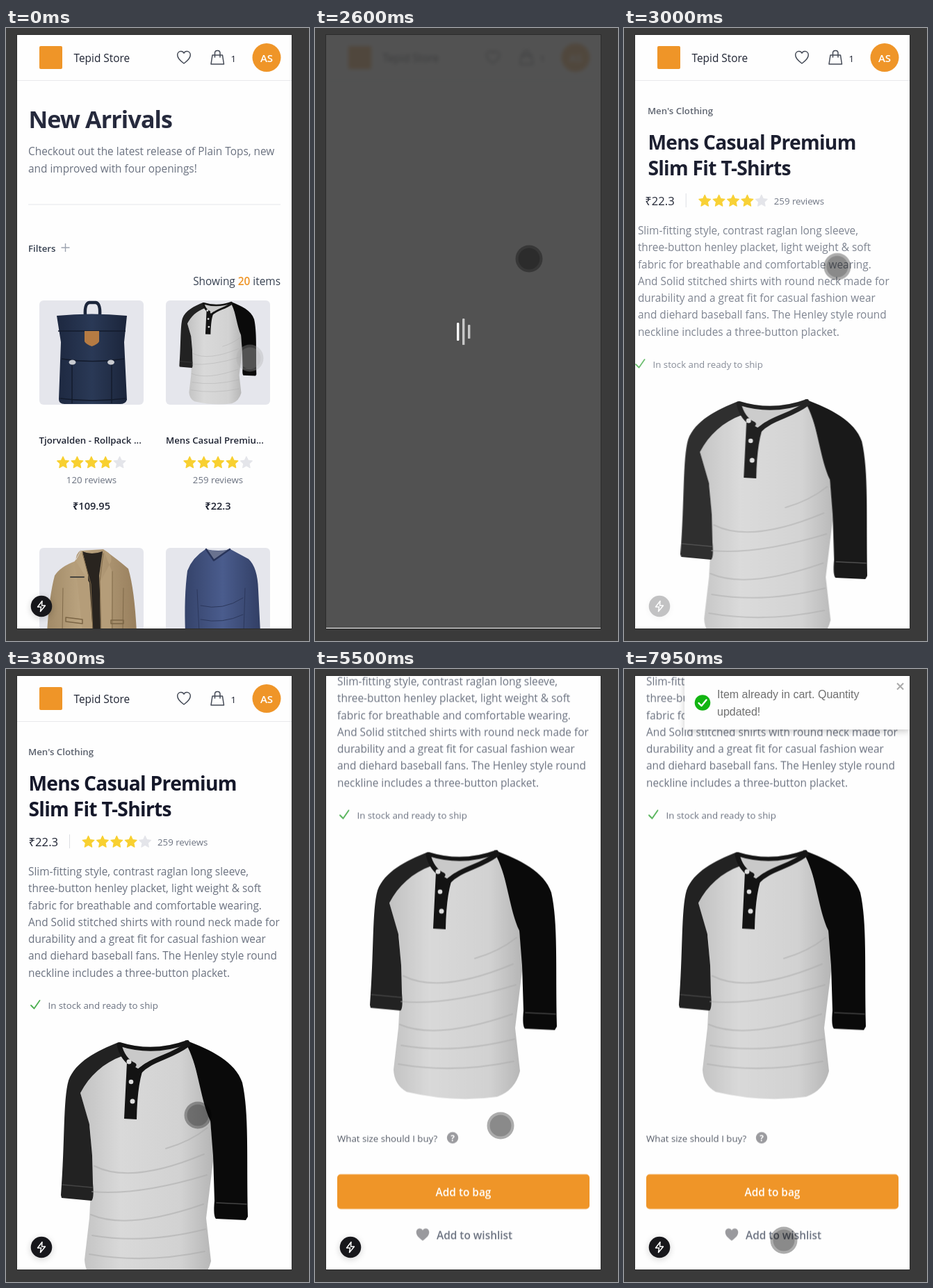
These frames come from a looping animation (436 px wide and 882 px high, 8 s). An HTML page:

```html
<!DOCTYPE html>
<html lang="en">
<head>
<meta charset="utf-8">
<title>Shop walkthrough</title>
<style>
html, body { margin: 0; width: 100%; height: 100%; overflow: hidden; background: #3a3a3a; }
svg { display: block; width: 436px; height: 882px; }
text { font: 400 15.4px "Open Sans", "Noto Sans", sans-serif; fill: #6b7280; white-space: pre; }
.small { font-size: 13.25px; }
.semi { font-weight: 600; }
.ink { fill: #1f2433; }
.mid { text-anchor: middle; }
.end { text-anchor: end; }
.title { font-weight: 700; letter-spacing: -.025em; fill: #15182a; }
.line { fill: none; stroke-linecap: round; stroke-linejoin: round; }
.toast text { font: 16px "Liberation Sans", Arial, sans-serif; fill: #707070; }

.scroll, .header, .list, .product, .slide, .badge, .shade, .loader, .toast, .cursor, .touch {
  animation: 8s linear infinite;
}
.scroll { animation-name: scroll; }
.header { animation-name: dim; }
.list { animation-name: leave; }
.product { animation-name: enter; }
.slide { animation-name: slide; animation-timing-function: ease-out; }
.badge { animation-name: badge; }
.shade { animation-name: shade; }
.loader { animation-name: loader; }
.toast { animation-name: toast; }
.cursor { animation-name: move; animation-timing-function: ease-in-out; }
.touch { animation-name: touch; }
.right { --from: 100px; --mid: 10px; --seen: .85; }
.photo { --from: 100px; --mid: 12px; --seen: .67; }
.left { --from: -100px; --mid: -12px; --seen: .85; }
.later { --from: -130px; --mid: -64px; --seen: .33; }
.last { --from: -130px; --mid: -100px; --seen: 0; }
.loader rect {
  transform-box: fill-box; transform-origin: center;
  animation: pulse .8s linear infinite;
}

@keyframes scroll {
  0%, 48.5% { transform: translateY(0); animation-timing-function: ease-in-out; }
  56.25%, 100% { transform: translateY(-273.5px); }
}
@keyframes dim {
  0%, 25.6% { opacity: 1; filter: blur(0); }
  29%, 32.8% { opacity: .3; filter: blur(2.5px); }
  34.4%, 100% { opacity: 1; filter: blur(0); }
}
@keyframes leave { 0%, 25.6% { opacity: 1; } 29%, 100% { opacity: 0; } }
@keyframes enter {
  0% { opacity: 0; animation-timing-function: step-end; }
  32.6%, 100% { opacity: 1; }
}
@keyframes slide {
  0%, 32.6% { transform: translateX(var(--from)); opacity: 0; }
  35% { transform: translateX(var(--mid)); opacity: var(--seen); }
  39%, 100% { transform: none; opacity: 1; }
}
@keyframes badge {
  0%, 25.6% { opacity: 1; }
  28%, 37% { opacity: 0; }
  39%, 100% { opacity: 1; }
}
@keyframes shade {
  0%, 25.6% { opacity: 0; }
  29%, 33% { opacity: .68; }
  35% { opacity: .325; }
  37%, 100% { opacity: 0; }
}
@keyframes loader {
  0%, 25.6% { opacity: 0; }
  28%, 35.6% { opacity: 1; }
  37%, 100% { opacity: 0; }
}
@keyframes pulse {
  0%, 100% { transform: scaleY(1); opacity: 1; }
  25%, 75% { transform: scaleY(.8); opacity: .68; }
}
@keyframes toast {
  0%, 80.5% { transform: translateX(345px); animation-timing-function: ease-out; }
  86%, 100% { transform: none; }
}
@keyframes move {
  0%, 23% { transform: translate(351px, 475px); }
  29%, 36.5% { transform: translate(308px, 332px); }
  44%, 49% { transform: translate(276px, 642px); }
  56%, 70% { transform: translate(267px, 657px); }
  77%, 90.5% { transform: translate(235px, 755px); }
  98%, 100% { transform: translate(230px, 822px); }
}
@keyframes touch {
  0%, 22% { fill: #aaa; }
  24%, 100% { fill: #000; }
}
</style>
</head>
<body>
<svg viewBox="0 0 436 882">
  <defs>
    <clipPath id="screen"><path d="M16 10H411V864H16z"/></clipPath>
    <clipPath id="tile"><rect width="150" height="150" rx="6"/></clipPath>
    <linearGradient id="cloth">
      <stop offset="0" stop-color="#c2c2c2"/><stop offset=".3" stop-color="#d9d9d9"/>
      <stop offset=".75" stop-color="#d2d2d2"/><stop offset="1" stop-color="#b5b5b5"/>
    </linearGradient>
    <linearGradient id="navy">
      <stop offset="0" stop-color="#1d2840"/><stop offset=".5" stop-color="#2a3956"/><stop offset="1" stop-color="#1b253b"/>
    </linearGradient>
    <linearGradient id="tan">
      <stop offset="0" stop-color="#a18a67"/><stop offset=".4" stop-color="#bca581"/><stop offset="1" stop-color="#987f5d"/>
    </linearGradient>
    <linearGradient id="blue">
      <stop offset="0" stop-color="#35436a"/><stop offset=".5" stop-color="#4a5c8d"/><stop offset="1" stop-color="#323f65"/>
    </linearGradient>
    <filter id="soft" x="-20%" y="-30%" width="140%" height="180%"><feGaussianBlur stdDeviation="5"/></filter>
    <path id="star" d="M0-8.3 2.5-2.9 8.4-2.2 4.1 1.9 5.2 7.6 0 4.8-5.2 7.6-4.1 1.9-8.4-2.2-2.5-2.9z" stroke-width="1.2" stroke-linejoin="round"/>
    <g id="stars">
      <g fill="#f8d030" stroke="#f8d030">
        <use href="#star"/><use href="#star" x="20.4"/><use href="#star" x="40.8"/><use href="#star" x="61.2"/>
      </g>
      <use href="#star" x="81.6" fill="#e4e5ea" stroke="#e4e5ea"/>
    </g>
    <path id="heart" d="M0 9C-5 5.5-9.3 1.8-9.3-3.2-9.3-6.3-7-8.5-4.3-8.5-2.3-8.5-.8-7.5 0-5.8.8-7.5 2.3-8.5 4.3-8.5 7-8.5 9.3-6.3 9.3-3.2 9.3 1.8 5 5.5 0 9z"/>

    <g id="shirt">
      <path fill="#c9c9c9" d="M164 537Q212 552 260 534L245 560 190 590 165 560z"/>
      <path fill="url(#cloth)" d="M163 549C140 560 116 585 107 610L121 660 124 712 120 790 113 850Q114 872 132 882 200 898 262 889 288 880 295 852L288 790 299 700 294 650 262 538C240 556 210 560 188 590L172 565z"/>
      <path fill="#222" d="M162 537C130 550 100 565 90 592 82 620 85 680 79 757L80 761 123 765Q127 762 125 740L124 700 120 655 107 610C120 585 140 567 167 557z"/>
      <path fill="#0a0a0a" d="M258 534C295 548 330 565 340 595 350 640 346 700 348 788L345 793 302 791Q298 787 300 765L298 700 294 650C280 620 277 575 262 545z"/>
      <path class="line" stroke="#151515" stroke-width="6" d="M164 540Q212 555 261 537"/>
      <path class="line" stroke="#151515" stroke-width="7" d="M163 541Q168 562 184 570M262 540C235 560 210 560 191 580"/>
      <path fill="#131313" d="M174 566 190 575 201 567Q189 590 188 648L170 647Z"/>
      <g fill="#ddd"><circle cx="177" cy="565" r="3.5"/><circle cx="180" cy="594" r="3.3"/><circle cx="182" cy="622" r="3.5"/></g>
      <g class="line" stroke="#a8a8a8" stroke-opacity=".5" stroke-width="2">
        <path d="M127 715Q180 742 285 698M124 752Q190 758 289 728M122 785Q175 808 284 770M124 815Q200 828 287 806M120 842Q200 856 286 838M230 690Q265 680 290 660"/>
      </g>
      <path class="line" stroke="#444" stroke-width="1.5" d="M81 742 124 746M303 768 346 770"/>
    </g>

    <g id="backpack">
      <path class="line" stroke="#1c263b" stroke-width="4.5" d="M66 21Q65 4 72 3H81Q88 4 87 21"/>
      <path fill="url(#navy)" d="M25 22Q75 17 126 22L122 60 126 143Q124 149 116 149H36Q28 149 28 142L31 60z"/>
      <path fill="none" stroke="#131b2c" stroke-width="1.5" d="M27 44H124M32 84Q76 91 122 84M47 88V148M104 88V148M30 141Q76 147 124 141"/>
      <path fill="#b57b43" d="M65 44H86V59Q84 63 75.500 66 67 63 65 59z"/>
      <g fill="#c9cbd0"><ellipse cx="47.500" cy="89" rx="5" ry="3.500"/><ellipse cx="103" cy="89" rx="5" ry="3.500"/></g>
    </g>

    <g id="jacket">
      <path fill="url(#tan)" d="M60 4 92 2Q113 17 128 30 137 60 140 122H11Q14 70 22 40 30 27 52 19z"/>
      <path fill="#29241f" d="M62 5Q75 11 91 5L86 40 90 122H72L70 38z"/>
      <path fill="#b59d79" d="M60 3Q51 9 53 20L72 50 77 122H62L55 52 50 21zM92 3Q106 8 103 20L87 50 88 122H103L105 35z"/>
      <path class="line" stroke="#806a4a" d="M34 58 33 122M121 58 120 122M62 8 74 52 77 122M92 8 87 48 89 122M105 34V118"/>
      <path class="line" stroke="#47443e" stroke-width="2" d="M45 42H64"/>
      <path class="line" stroke="#7b6545" stroke-width="1.500" d="M38 100 62 103V109L38 106zM103 104H121V109H103z"/>
    </g>

    <g id="sweater">
      <path fill="url(#blue)" d="M57 2Q76 6 93 2L119 16Q132 28 133 60L136 122H28Q26 70 31 33 38 14 57 2z"/>
      <path fill="#69728f" d="M58 2Q75 7 91 2L69 18z"/>
      <path class="line" stroke="#28345a" stroke-width="2.500" d="M58 2 69 18 92 2"/>
      <path class="line" stroke="#2c385c" d="M45 60 48 122M114 58 112 122M50 83Q82 91 111 72M50 103Q82 110 111 96"/>
    </g>
  </defs>

  <rect width="436" height="882" fill="#3a3a3a"/>
  <path d="M15 9H412V865H15z" fill="#2c2c2c"/>
  <g clip-path="url(#screen)">
    <path d="M16 10H411V864H16z" fill="#fefefe"/>

    <g class="scroll">
      <g class="header">
        <rect x="48" y="26" width="33" height="33" rx="2" fill="#ef9528"/>
        <text x="97.500" y="49" class="ink">Tepid Store</text>
        <g class="line" stroke="#444a56" stroke-width="1.500">
          <use href="#heart" x="256" y="42"/>
          <path d="M297 39H311.500L313.500 52H295zM300.500 42V36Q300.500 32.500 304.300 32.500 308 32.500 308 36V42"/>
        </g>
        <text x="323.500" y="49" class="small ink">1</text>
        <circle cx="375" cy="42.500" r="20.500" fill="#ef9528"/>
        <text x="375" y="48.500" class="mid semi" style="fill:#fff;font-size:15px">AS</text>
        <path d="M16 75.500H411" stroke="#e8e9ec"/>
      </g>

      <g class="list">
        <text x="32.500" y="144" class="title" style="font-size:34px;fill:#262a3d">New Arrivals</text>
        <text x="32" y="183">Checkout out the latest release of Plain Tops, new</text>
        <text x="32" y="208">and improved with four openings!</text>
        <path d="M32 254H395" stroke="#e5e7eb"/>
        <text x="32" y="321.500" class="small semi" style="fill:#374151">Filters</text>
        <path d="M79.500 316H91.500M85.500 310V322" stroke="#9ca3af" stroke-width="1.400"/>
        <text x="395" y="370" class="end" style="fill:#374151">Showing <tspan class="semi" fill="#ef9528">20</tspan> items</text>

        <g fill="#e5e6ec">
          <g transform="translate(48 392)" clip-path="url(#tile)"><path d="M0 0H150V150H0z"/><use href="#backpack"/></g>
          <g transform="translate(230 392)" clip-path="url(#tile)"><path d="M0 0H150V150H0z"/><use href="#shirt" transform="translate(-13.200 -218.500) scale(.4125)"/></g>
          <g transform="translate(48 748)" clip-path="url(#tile)"><path d="M0 0H150V150H0z"/><use href="#jacket"/></g>
          <g transform="translate(230 748)" clip-path="url(#tile)"><path d="M0 0H150V150H0z"/><use href="#sweater"/></g>
        </g>
        <text x="47.500" y="598" class="small semi ink">Tjorvalden - Rollpack ...</text>
        <text x="230" y="598" class="small semi ink">Mens Casual Premiu...</text>
        <use href="#stars" x="82" y="625"/>
        <use href="#stars" x="264.300" y="625"/>
        <text x="123" y="655" class="small mid">120 reviews</text>
        <text x="305" y="655" class="small mid">259 reviews</text>
        <g class="semi">
          <text x="123" y="693" class="mid ink" style="font-size:14.600px;font-weight:600">₹109.95</text>
          <text x="305" y="693" class="mid ink" style="font-size:14.600px;font-weight:600">₹22.3</text>
        </g>
      </g>

      <g class="product">
        <g class="slide right">
          <text x="32" y="124" class="small semi" style="fill:#5a606c">Men's Clothing</text>
          <g style="font-size:28.200px">
            <text x="32.500" y="175" class="title" style="font-size:28.200px">Mens Casual Premium</text>
            <text x="32.500" y="212" class="title" style="font-size:28.200px">Slim Fit T-Shirts</text>
          </g>
        </g>
        <g class="slide left">
          <text x="32.500" y="254.500" class="ink" style="font-size:16.700px">₹22.3</text>
          <path d="M91.500 238V258" stroke="#dcdee3"/>
          <use href="#stars" x="118.500" y="248.500"/>
          <text x="218" y="254" class="small">259 reviews</text>
        </g>
        <g class="slide later">
          <text x="32" y="297">Slim-fitting style, contrast raglan long sleeve,</text>
          <text x="32" y="321.300">three-button henley placket, light weight &amp; soft</text>
          <text x="32" y="345.500">fabric for breathable and comfortable wearing.</text>
          <text x="32" y="369.800">And Solid stitched shirts with round neck made for</text>
          <text x="32" y="394">durability and a great fit for casual fashion wear</text>
          <text x="32" y="418.300">and diehard baseball fans. The Henley style round</text>
          <text x="32" y="442.500">neckline includes a three-button placket.</text>
        </g>
        <g class="slide last">
          <path class="line" stroke="#4caf50" stroke-width="1.800" d="M36 484 40.500 488.500 48.500 477"/>
          <text x="60.500" y="488.500" class="small">In stock and ready to ship</text>
        </g>
        <use class="slide photo" href="#shirt"/>
        <text x="32" y="953.500" class="small" style="fill:#565c68">What size should I buy?</text>
        <circle cx="198" cy="948" r="8.200" fill="#9b9b9f"/>
        <text x="198" y="952.500" class="mid" style="fill:#fff;font-size:12px;font-weight:700">?</text>
        <rect x="32" y="1000.500" width="363" height="50" rx="5" fill="#ef9528"/>
        <text x="213.500" y="1031.500" class="mid semi" style="fill:#fff">Add to bag</text>
        <use href="#heart" x="155" y="1087" fill="#9a9a9e"/>
        <text x="175" y="1093.500" class="semi">Add to wishlist</text>
      </g>
    </g>

    <g class="badge">
      <circle cx="51" cy="834" r="16" fill="#000" opacity=".15" filter="url(#soft)"/>
      <circle cx="51" cy="832" r="15.300" fill="#17171b"/>
      <path class="line" stroke="#fff" stroke-width="1.500" d="M52 824.500 45.500 833H50.500L49.500 839.500 56.500 831H51.500z"/>
    </g>

    <g class="toast">
      <rect x="87" y="12" width="324" height="78" fill="#000" opacity=".2" filter="url(#soft)"/>
      <path d="M87 10H411V87H87z" fill="#fefefe"/>
      <circle cx="113" cy="48.500" r="11.300" fill="#12b512"/>
      <path class="line" stroke="#fff" stroke-width="2.400" d="M107.500 49 111.500 53 118.500 44.500"/>
      <text x="134" y="42">Item already in cart. Quantity</text>
      <text x="134" y="67">updated!</text>
      <path d="M393 20.500 402 29.500M402 20.500 393 29.500" stroke="#a9a9a9" stroke-width="2"/>
    </g>

    <path class="shade" d="M16 10H411V863H16z"/>
    <g class="loader" fill="#fff">
      <rect x="204" y="424" width="3.400" height="26" rx="1.500" style="animation-delay:-.6s"/>
      <rect x="212" y="413" width="3.400" height="48" rx="1.500" style="animation-delay:-.4s"/>
      <rect x="220" y="424" width="3.400" height="26" rx="1.500" style="animation-delay:-.2s"/>
    </g>

    <g class="cursor">
      <g class="touch">
        <circle r="19.500" opacity=".32"/>
        <circle r="15.500" opacity=".2"/>
      </g>
    </g>
  </g>
</svg>
</body>
</html>
```
